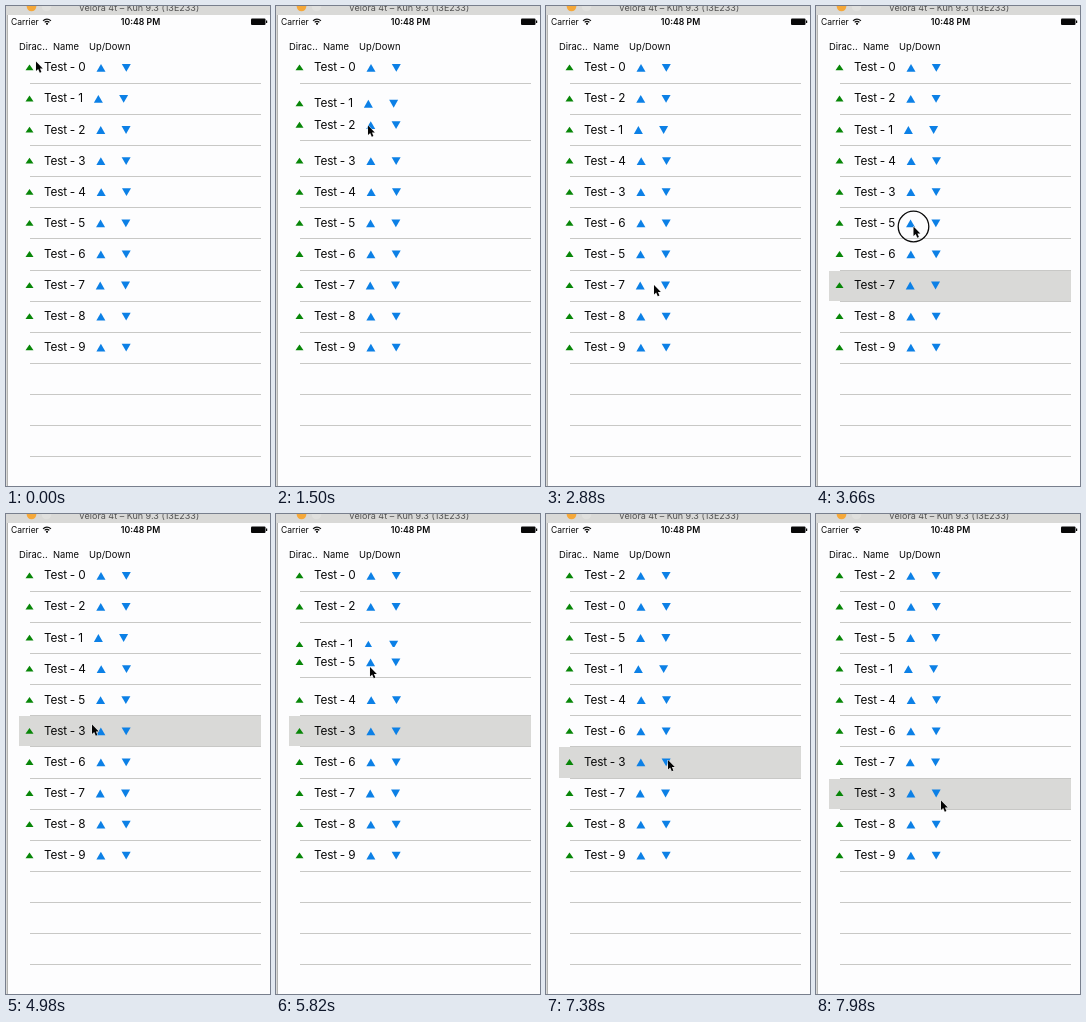
Animation, 264 px wide and 480 px high, one loop 8000 ms. Source, as an HTML page with a canvas:

```html
<!DOCTYPE html>
<html lang="en">
<head>
<meta charset="utf-8">
<title>Reordering list</title>
<style>
html, body { margin: 0; width: 100%; height: 100%; overflow: hidden; background: #fdfdfe; }
canvas { display: block; width: 264px; height: 480px; }
</style>
</head>
<body>
<canvas id="stage"></canvas>
<script>
const W = 264, H = 480, LOOP = 8000, STEP = 30;
const TOP = 46, ROW = 31.1, ROWS = 10, SLIDE = 300;
const PRESS = 90, TRAVEL = 180, SETTLE = 120;
const FONT = 'Inter, Roboto, sans-serif';
const WHITE = '#fdfdfe', GRAY = '#d9d9d7', LINE = '#c8c8c6', BLUE = '#0c80e6';

const canvas = document.getElementById('stage');
const ctx = canvas.getContext('2d');
const dpr = window.devicePixelRatio || 1;
canvas.width = W * dpr;
canvas.height = H * dpr;

// Pointer clicks: time of release, x, y. What a click does follows from its place.
const clicks = [
  [1425, 92, 119.5], [1980, 94, 183], [2460, 94, 246], [3000, 108, 279],
  [3315, 96, 247], [3720, 97.5, 220.5], [4500, 86, 210.5], [5310, 94, 185],
  [5730, 94, 153], [6300, 94, 91], [6990, 122, 213], [7500, 122, 246]
];
const stops = [[0, 30, 55.5], ...clicks, [LOOP, 125, 286.5]];

const clamp = p => Math.min(1, Math.max(0, p));
const smooth = p => p * p * (3 - 2 * p);
const near = (a, b) => Math.abs(a - b) < 7;

function rect(x, y, w, h, color) {
  ctx.fillStyle = color;
  ctx.fillRect(x, y, w, h);
}

function disc(x, y, r, color) {
  ctx.fillStyle = color;
  ctx.beginPath();
  ctx.arc(x, y, r, 0, Math.PI * 2);
  ctx.fill();
}

function setFont(size, weight = 400, spacing = 0) {
  ctx.font = `${weight} ${size}px ${FONT}`;
  ctx.letterSpacing = spacing + 'px';
}

function text(str, x, y, color = '#080808', align = 'left') {
  ctx.textAlign = align;
  ctx.fillStyle = color;
  ctx.fillText(str, x, y);
}

function polygon(points) {
  ctx.beginPath();
  points.forEach(([x, y]) => ctx.lineTo(x, y));
  ctx.closePath();
}

// Triangle with its tip at tipY and its flat side at baseY
function triangle(x, tipY, baseY, half, color) {
  polygon([[x, tipY], [x + half, baseY], [x - half, baseY]]);
  ctx.fillStyle = color;
  ctx.fill();
}

// Replays the clicks up to t and returns the rows, the moving one last
function layout(t) {
  const order = [...Array(ROWS).keys()];
  const shift = {};
  let front, selected;
  for (const [time, x, y] of clicks) {
    if (t < time) break;
    const row = Math.floor((y - TOP) / ROW);
    const item = order[row];
    const dir = near(x, 95) ? -1 : near(x, 120) ? 1 : 0;
    if (!dir) {
      selected = item;
      continue;
    }
    const other = order[row + dir];
    order[row] = other;
    order[row + dir] = item;
    front = item;
    const left = 1 - smooth(clamp((t - time) / SLIDE));
    shift[item] = -dir * left;
    shift[other] = dir * left;
  }
  return order
    .map((item, row) => ({ item, y: TOP + (row + (shift[item] || 0)) * ROW, selected: item === selected }))
    .sort((a, b) => (a.item === front) - (b.item === front));
}

const edge = y => Math.round(y - 0.2);

function drawLine(y) {
  rect(24, edge(y), 231, 1, LINE);
}

function drawCell({ item, y, selected }) {
  const top = edge(y) + 1;
  rect(13, top, 242, edge(y + ROW) - top, selected ? GRAY : WHITE);
  drawLine(y + ROW);
  const mid = y + 15.3;
  const label = 'Test - ' + item;
  setFont(11.8, 400, -0.22);
  text(label, 38, mid + 4);
  const up = 95 + ctx.measureText(label).width - ctx.measureText('Test - 0').width;
  triangle(23.5, mid - 2.8, mid + 3, 4, '#088608');
  triangle(up, mid - 3.4, mid + 4.4, 4.5, BLUE);
  triangle(up + 25.3, mid + 4.4, mid - 3.4, 4.5, BLUE);
}

function drawWifi(x, y) {
  ctx.strokeStyle = '#111';
  ctx.lineWidth = 1.2;
  for (const r of [3.2, 5.4]) {
    ctx.beginPath();
    ctx.arc(x, y, r, -Math.PI * 0.76, -Math.PI * 0.24);
    ctx.stroke();
  }
  disc(x, y - 0.8, 1.1, '#111');
}

function drawChrome() {
  rect(0, 0, W, 9, GRAY);
  disc(25.5, 0.5, 4.8, '#f5a83a');
  disc(40.5, 0.5, 4.8, '#e0e0de');
  setFont(9);
  text('Velora 4t – Kun 9.3 (13E233)', 133, 5, '#505050', 'center');
  rect(0, 9, 1, H - 9, GRAY);
  rect(1, 9, 1, H - 9, '#b4b4b2');

  setFont(8.5);
  text('Carrier', 5, 19);
  drawWifi(41, 18.6);
  setFont(8.7, 600);
  text('10:48 PM', 134.5, 19, '#080808', 'center');
  ctx.beginPath();
  ctx.roundRect(245, 12.5, 14.5, 6.5, 1);
  ctx.fill();
  rect(260, 14.5, 1.2, 2.5, '#080808');

  setFont(9.4);
  text('Dirac..', 13, 44);
  text('Name', 47, 44);
  text('Up/Down', 83, 44);
}

function drawPointer(t) {
  const next = stops.findIndex(s => s[0] > t);
  const [, x0, y0] = stops[next - 1];
  const [time, x1, y1] = stops[next];
  const p = smooth(clamp((t - time + SETTLE + TRAVEL) / TRAVEL));
  const x = x0 + (x1 - x0) * p, y = y0 + (y1 - y0) * p;
  if (time < LOOP && t >= time - PRESS) {
    ctx.strokeStyle = '#0a0a0a';
    ctx.lineWidth = 1.3;
    ctx.beginPath();
    ctx.arc(x, y, 15.3, 0, Math.PI * 2);
    ctx.stroke();
  }
  ctx.save();
  ctx.translate(x, y);
  polygon([[0, 0], [0, 9.6], [2.2, 7.6], [3.8, 11.2], [5.4, 10.5], [3.9, 7], [6.8, 7]]);
  ctx.lineJoin = 'round';
  ctx.lineWidth = 1;
  ctx.strokeStyle = '#f4f4f4';
  ctx.stroke();
  ctx.fillStyle = '#050505';
  ctx.fill();
  ctx.restore();
}

function draw(t) {
  ctx.setTransform(dpr, 0, 0, dpr, 0, 0);
  rect(0, 0, W, H, WHITE);
  layout(t).forEach(drawCell);
  for (let row = ROWS + 1; row <= ROWS + 3; row++) drawLine(TOP + row * ROW);
  drawChrome();
  drawPointer(t);
}

const begin = performance.now();
function frame() {
  const t = (performance.now() - begin) % LOOP;
  draw(Math.floor(t / STEP) * STEP);
  requestAnimationFrame(frame);
}
frame();
</script>
</body>
</html>
```
